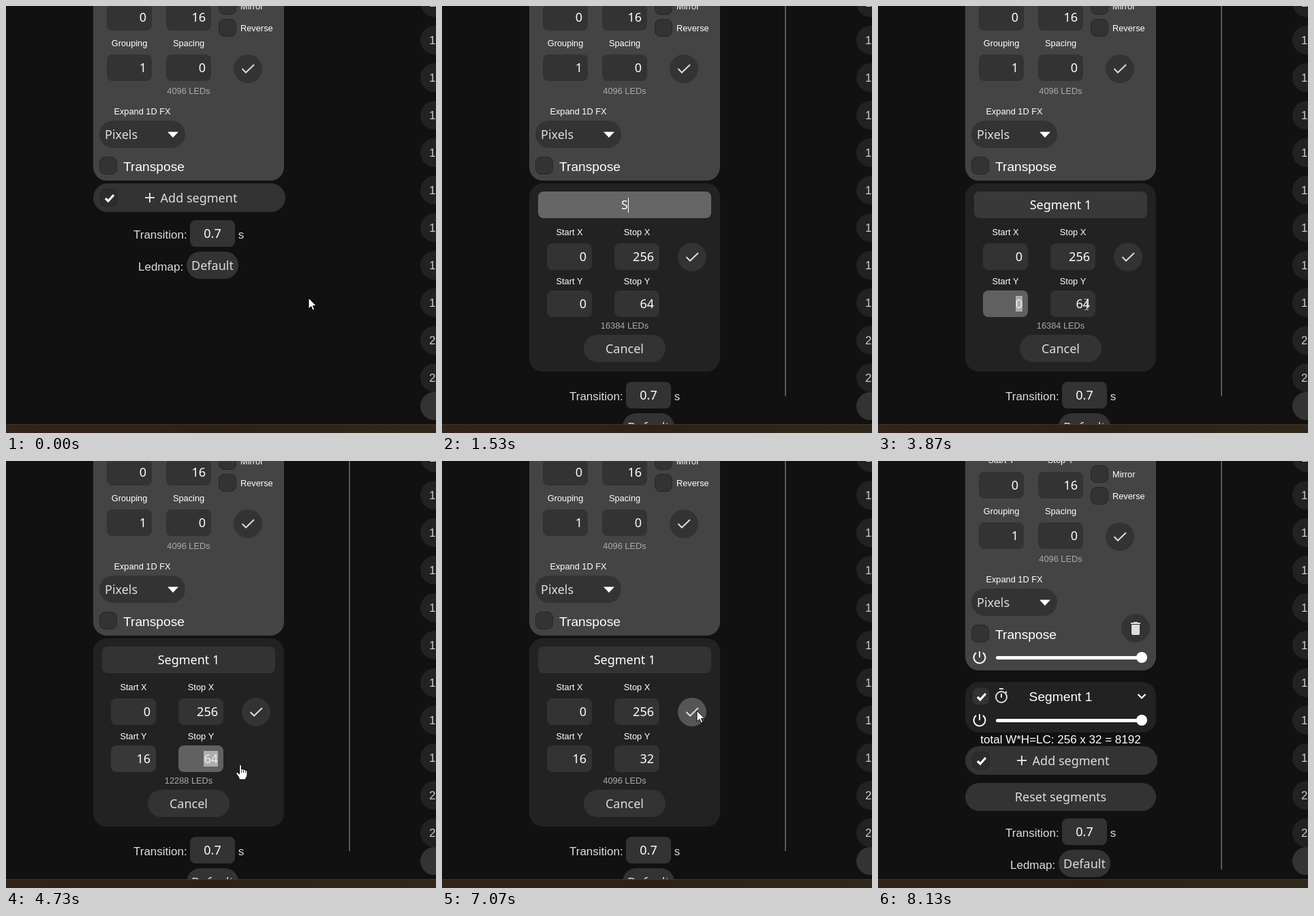
An HTML page with a canvas for the animation above (8470 ms loop, 631 px wide and 626 px high).

```html
<!DOCTYPE html>
<html lang="en">
<head>
<meta charset="utf-8">
<title>Add segment</title>
<style>
  html, body { margin: 0; width: 100%; height: 100%; overflow: hidden; background: #111; }
  canvas { display: block; }
</style>
</head>
<body>
<canvas id="stage" width="631" height="626"></canvas>
<script>
const ctx = document.getElementById('stage').getContext('2d');
const LOOP = 8470;
const SANS = '"Liberation Sans", Arial, sans-serif';
const UI = '"Noto Sans", sans-serif';
const SMALL = '12.8px ' + SANS, BODY = '17px ' + SANS, HEAD = '19.2px ' + SANS, FIELD = '18px ' + UI;

// Moments of interaction, in ms
const OPEN = 390, NAME_FOCUS = 930, START_FOCUS = 3540, STOP_FOCUS = 4390, APPLY = 6660, REBUILD = 7270;

const NAME = [[1530, 'S'], [1730, 'Seg'], [1800, 'Segm'], [2070, 'Se'], [2130, 'Seg'], [2270, 'Segm'],
  [2470, 'Segme'], [2670, 'Segment'], [2730, 'Segment '], [2930, 'Segment 1']];
const START_Y = [[0, '0'], [4200, '1'], [4330, '16']];
const STOP_Y = [[0, '64'], [5070, '3'], [5330, '32']];
const POINTER = [
  [0, 444, 428, 'arrow'], [70, 444, 428, 'arrow'], [250, 320, 292, 'hand'], [OPEN, 303, 287, 'beam'],
  [1530, 303, 287, ''], [3330, 303, 287, 'beam'], [3530, 208, 437, 'beam'], [3600, 208, 437, 'beam'],
  [3870, 306, 437, 'beam'], [4200, 306, 437, ''], [4500, 306, 437, 'beam'], [4640, 330, 441, 'hand'],
  [4870, 366, 450, 'hand'], [5070, 366, 450, ''], [5470, 366, 450, 'hand'], [5600, 371, 408, 'hand'],
  [6040, 373, 366, 'hand'], [6270, 374, 366, 'arrow'], [7400, 374, 366, 'arrow'],
  [7870, 381, 333, 'arrow'], [7930, 381, 333, 'arrow'], [8130, 125, 626, '']];

const clamp = v => Math.min(1, Math.max(0, v));
const ease = (t, from, span = 500) => 1 - (1 - clamp((t - from) / span)) ** 2;
const pulse = (t, on, off, span) => ease(t, on, span) * (1 - ease(t, off, span));
const grey = v => { const n = Math.round(v); return `rgb(${n},${n},${n})`; };
const mix = (a, b, p) => grey(a + (b - a) * p);
const lastKey = (list, t) => list.filter(k => k[0] <= t).pop();
const valueAt = (list, t) => (lastKey(list, t) || [0, ''])[1];

function box(x, y, w, h, r, fill, stroke) {
  ctx.beginPath();
  ctx.roundRect(x, y, w, h, r);
  ctx.fillStyle = fill;
  ctx.fill();
  if (stroke) { ctx.strokeStyle = stroke; ctx.lineWidth = 1; ctx.stroke(); }
}

function disc(x, y, r, fill) {
  ctx.beginPath();
  ctx.arc(x, y, r, 0, 7);
  ctx.fillStyle = fill;
  ctx.fill();
}

function line(points, width, color, cap = 'butt') {
  ctx.beginPath();
  points.forEach(([x, y]) => ctx.lineTo(x, y));
  ctx.lineWidth = width;
  ctx.lineCap = cap;
  ctx.strokeStyle = color;
  ctx.stroke();
}

// y is the middle of the capitals
function text(str, x, y, font, color = '#fff', align = 'center') {
  ctx.font = font;
  ctx.textAlign = align;
  ctx.fillStyle = color;
  ctx.fillText(str, x, Math.round(y + parseFloat(font) * 0.36));
}

function at(x, y, draw) {
  ctx.save();
  ctx.translate(x, y);
  draw();
  ctx.restore();
}

function numberField(x, y, value, fill = '#333') {
  box(x, y, 66, 39, 8, fill);
  text(value, x + 58, y + 20, FIELD, '#fff', 'right');
}

function checkbox(x, y, checked, fill = '#333') {
  box(x - 12.5, y - 12.5, 25, 25, 8, fill, '#252525');
  if (checked) line([[x - 5, y + 1], [x - 1, y + 5], [x + 7, y - 4]], 3.2, '#fff');
}

function tickButton(x, y, fill = '#333') {
  disc(x, y, 21, fill);
  line([[x - 8.5, y], [x - 3, y + 5.5], [x + 9, y - 6]], 2, '#ddd');
}

function pill(x, y, w, h, label, fill = '#333', labelX = x + w / 2) {
  box(x, y, w, h, h / 2, fill);
  text(label, labelX, y + h / 2 + 0.5, FIELD, '#ddd');
}

function caret(x, y) {
  ctx.fillStyle = '#fff';
  ctx.fillRect(x, y, 1, 22);
}

function powerSlider(y) {
  ctx.beginPath();
  ctx.arc(149, y, 8.5, -0.95, Math.PI + 0.95);
  ctx.lineWidth = 2;
  ctx.strokeStyle = '#fff';
  ctx.stroke();
  line([[149, y - 9], [149, y]], 2, '#fff');
  box(173, y - 2, 221, 5, 2.5, '#fff');
  disc(387, y, 8, '#fff');
}

function trash(x, y) {
  disc(x, y, 21, '#333');
  ctx.fillStyle = '#ddd';
  ctx.fillRect(x - 7, y - 8, 14, 2);
  ctx.fillRect(x - 3, y - 9, 6, 2);
  box(x - 6, y - 5, 12, 15, [0, 0, 2, 2], '#ddd');
}

function stopwatch(x, y) {
  ctx.beginPath();
  ctx.arc(x, y + 1, 8, 0, 7);
  ctx.lineWidth = 2;
  ctx.strokeStyle = '#ddd';
  ctx.stroke();
  line([[x - 3, y - 11], [x + 3, y - 11]], 2, '#ddd');
  line([[x, y - 4], [x, y + 2]], 2, '#ddd');
  line([[x + 6, y - 7], [x + 8, y - 5]], 2, '#ddd');
}

function mainSegment(extended) {
  box(128, -60, 280, extended ? 348 : 316, 20, '#444');
  text('Start Y', 181, -21, SMALL);
  text('Stop Y', 268, -21, SMALL);
  numberField(148, -3, '0');
  numberField(235, -3, '16');
  checkbox(325, 0);
  text('Mirror', 344, 0, SMALL, '#fff', 'left');
  checkbox(325, 32);
  text('Reverse', 344, 32, SMALL, '#fff', 'left');
  text('Grouping', 181, 54, SMALL);
  text('Spacing', 268, 54, SMALL);
  numberField(148, 71, '1');
  numberField(235, 71, '0');
  tickButton(355, 92);
  text('4096 LEDs', 268, 124, SMALL, '#aaa');
  text('Expand 1D FX', 200, 154, SMALL);
  box(137, 168, 126, 40, 20, '#333');
  text('Pixels', 145, 189, FIELD, '#ddd', 'left');
  ctx.beginPath();
  ctx.moveTo(237, 184.5);
  ctx.lineTo(253, 184.5);
  ctx.lineTo(245, 193);
  ctx.fillStyle = '#fff';
  ctx.fill();
  checkbox(150, 234);
  text('Transpose', 172, 235, HEAD, '#fff', 'left');
  if (extended) {
    trash(378, 226);
    powerSlider(269);
  }
}

function addButton(y, hover = 0) {
  pill(128, y, 282, 42, 'Add segment', mix(51, 85, hover), 283);
  line([[204, y + 21], [218, y + 21]], 2, '#ddd');
  line([[211, y + 14], [211, y + 28]], 2, '#ddd');
  checkbox(151, y + 21, true, '#2d2d2d');
}

function footer(dy) {
  at(0, dy, () => {
    text('Transition:', 187, 335, BODY, '#ddd', 'left');
    box(270, 314, 66, 39, 8, '#333');
    text('0.7', 303, 334, FIELD);
    text('s', 345, 335, BODY, '#ddd');
    text('Ledmap:', 194, 382, BODY, '#ddd', 'left');
    pill(265, 360, 76, 40, 'Default');
  });
}

function ledCount(start, stop) {
  const rows = stop - start;
  return rows > 0 ? rows * 256 + ' LEDs' : '(delete)';
}

function segmentForm(t) {
  const name = valueAt(NAME, t), start = valueAt(START_Y, t), stop = valueAt(STOP_Y, t);
  const focusFill = (on, off) => mix(51, 102, pulse(t, on, off));
  const blinkOn = since => Math.floor((t - since) / 530) % 2 === 0;

  box(128, 260, 280, 276, 20, '#222');
  box(141, 272, 254, 39, 8, focusFill(NAME_FOCUS, START_FOCUS));
  text(name || 'New segment 1', 268, 292, FIELD, name ? '#fff' : '#999');
  if (t >= NAME_FOCUS && t < START_FOCUS && blinkOn((lastKey(NAME, t) || [NAME_FOCUS])[0])) {
    caret(Math.round(268 + ctx.measureText(name).width / 2 * (name ? 1 : 0)), 281);
  }

  text('Start X', 187, 331, SMALL);
  text('Stop X', 286, 331, SMALL);
  numberField(154, 348, '0');
  numberField(253, 348, '256');
  tickButton(367, 368, mix(51, 85, ease(t, 5800, 250)));

  text('Start Y', 187, 403, SMALL);
  text('Stop Y', 286, 403, SMALL);
  numberField(154, 417, start, focusFill(START_FOCUS, STOP_FOCUS));
  if (t >= START_FOCUS && t < 4200) selection(202, 10);
  if (t >= 4200 && t < STOP_FOCUS) caret(211, 425);
  numberField(253, 417, stop, mix(51, 102, ease(t, STOP_FOCUS) * (1 - ease(t, APPLY, 140))));
  if (t >= STOP_FOCUS && t < 5070) selection(290, 21);
  if (t >= 5070 && t < APPLY && blinkOn(lastKey(STOP_Y, t)[0])) caret(310, 425);

  text(ledCount(+start, +stop), 268, 468, SMALL, '#aaa');
  pill(208, 482, 120, 40, 'Cancel');
}

function selection(x, w) {
  ctx.fillStyle = 'rgba(225,225,225,.6)';
  ctx.fillRect(x, 425, w, 23);
}

function newSegment() {
  box(128, 324, 280, 74, 20, '#222');
  checkbox(151, 345, true);
  stopwatch(181, 345);
  text('Segment 1', 268, 345, HEAD);
  line([[381.5, 342], [387, 347.5], [392.5, 342]], 2.2, '#fff');
  powerSlider(380);
  text('total W*H=LC: 256 x 32 = 8192', 268, 408, BODY);
  addButton(418);
  pill(128, 472, 280, 41, 'Reset segments');
}

function sideButtons() {
  for (let n = 11; n <= 21; n++) {
    const y = 50 + (n - 12) * 55;
    disc(629, y, 21, '#222');
    text(String(n), 621, y, BODY, '#ccc', 'left');
  }
  disc(628.5, 586.5, 20.5, '#333');
}

function bottomStrip() {
  const g = ctx.createLinearGradient(0, 0, 631, 0);
  g.addColorStop(0, '#33231a');
  g.addColorStop(0.5, '#2d2218');
  g.addColorStop(1, '#30271a');
  ctx.fillStyle = g;
  ctx.fillRect(0, 613, 631, 13);
  ctx.fillStyle = '#44342a';
  ctx.fillRect(0, 613, 631, 1);
}

const ARROW = new Path2D('M0 0V16L3.8 12.6L6.2 18L8.8 17L6.4 11.6H11.4Z');
const HAND = new Path2D('M-1.5 1.5Q0 -.8 1.5 1.5V7Q3.5 5.8 4.5 7.6Q6.5 6.5 7.5 8.4Q10 7.5 10 10.5V15Q10 18 8 19.5V22H-2V19.5L-6 13.5Q-7 11 -4.6 11.2L-1.5 14Z');
const CURSORS = {
  arrow() { outlined(ARROW); },
  hand() {
    outlined(HAND);
    [1.5, 4.5, 7.5].forEach(x => line([[x, 8], [x, 12]], 0.8, '#000'));
  },
  beam() {
    line([[-3, -7.5], [-1, -7.5], [0, -6.5], [1, -7.5], [3, -7.5]], 1, '#ccc');
    line([[-3, 8.5], [-1, 8.5], [0, 7.5], [1, 8.5], [3, 8.5]], 1, '#ccc');
    line([[0.5, -7], [0.5, 8]], 1, '#ccc');
  }
};

function outlined(path) {
  ctx.fillStyle = '#fff';
  ctx.fill(path);
  ctx.lineWidth = 1;
  ctx.strokeStyle = '#000';
  ctx.stroke(path);
}

function pointer(t) {
  const here = lastKey(POINTER, t);
  const [t0, x, y, kind] = here;
  if (!kind) return;
  const next = POINTER[POINTER.indexOf(here) + 1];
  const p = (t - t0) / (next[0] - t0);
  at(Math.round(x + (next[1] - x) * p), Math.round(y + (next[2] - y) * p), CURSORS[kind]);
}

function render(t) {
  const done = t >= REBUILD;
  ctx.fillStyle = '#111';
  ctx.fillRect(0, 0, 631, 626);
  at(0, done ? 19 : 0, () => mainSegment(done));
  if (done) {
    newSegment();
    footer(210);
  } else if (t >= OPEN) {
    segmentForm(t);
    footer(237);
  } else {
    addButton(260, ease(t, 230, 250));
    footer(0);
  }
  ctx.fillStyle = mix(17, 88, clamp((t - 420) / 450));
  ctx.fillRect(503, 0, 2, done ? 599 : 572);
  sideButtons();
  bottomStrip();
  pointer(t);
}

const begin = performance.now();
function tick() {
  render((performance.now() - begin) % LOOP);
  requestAnimationFrame(tick);
}
tick();
</script>
</body>
</html>
```
